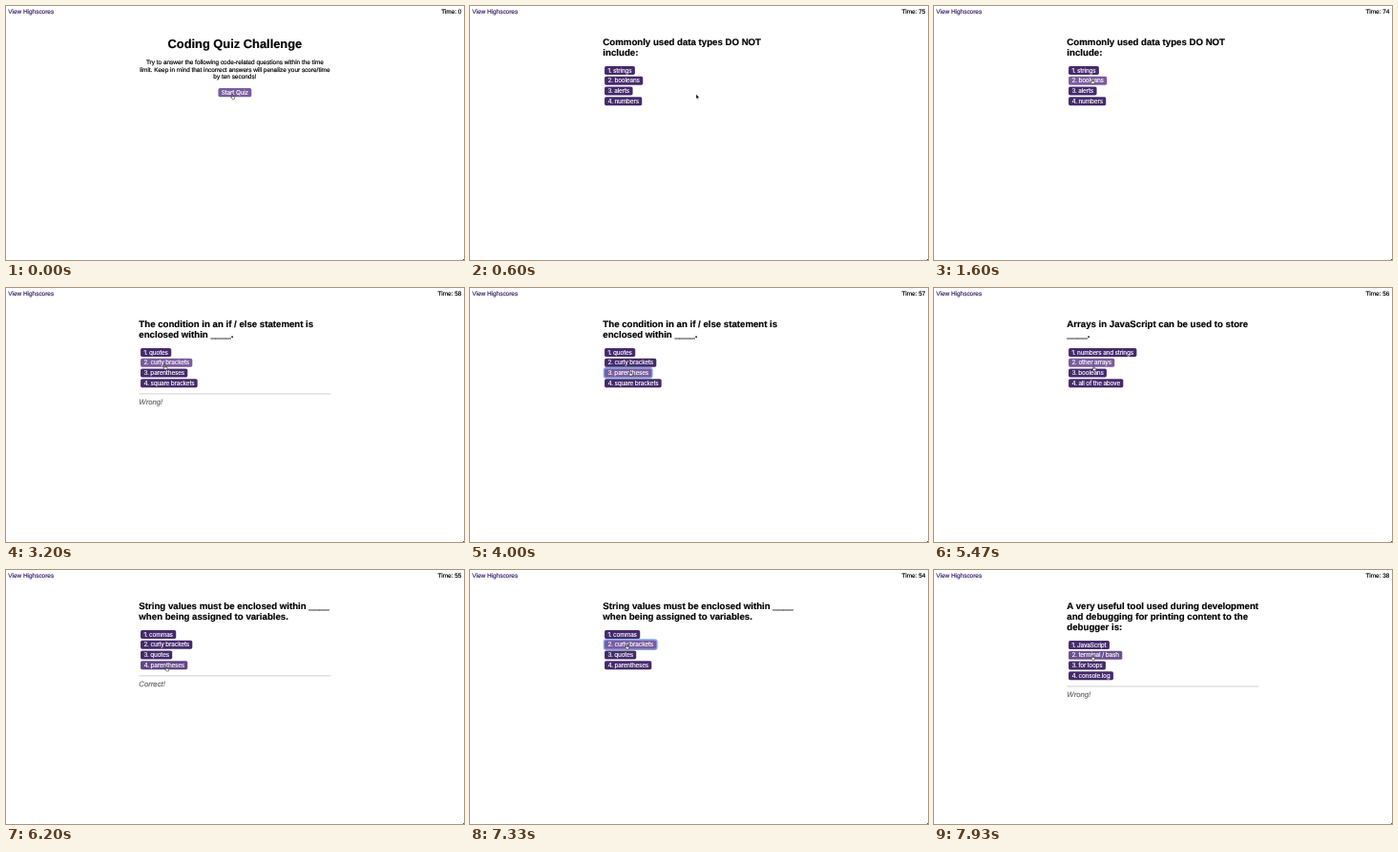
An HTML page that plays this animation: 480 by 266 pixels, repeating every 8000 ms.

```html
<!DOCTYPE html>
<html lang="en">
<head>
<meta charset="utf-8">
<title>Coding Quiz</title>
<style>
  html, body { margin: 0; width: 100%; height: 100%; overflow: hidden; background: #fff; }
  #stage { position: absolute; left: 0; top: 0; width: 480px; height: 266px; overflow: hidden; }
  #page {
    position: absolute; left: -1.35px; top: -1.05px; width: 1438px; height: 800px;
    transform: scale(.335); transform-origin: 0 0;
    font: 19.2px/22px "Liberation Sans", Arial, sans-serif;
    text-rendering: geometricPrecision; white-space: pre; color: #000;
    -webkit-text-stroke: .5px;
  }
  #scores, #timer { position: absolute; top: 10px; }
  #scores { left: 10px; color: #3a2168; }
  #timer { right: 10px; }
  #wrap { position: absolute; left: 419px; top: 100px; width: 600px; }
  #start { text-align: center; }
  h1 { font-size: 38.4px; line-height: 44px; margin: 0 0 25.7px; }
  h2 { font-size: 28.8px; line-height: 33px; margin: 0 0 24.9px; }
  p { margin: 0 0 19.2px; }
  button {
    margin: 5px; padding: 2px 10px; border: 0; border-radius: 5px; color: #fff;
    font: 19.2px/23px Inter, "Liberation Sans", sans-serif; letter-spacing: -.029em;
  }
  #choices button { display: block; }
  #feedback {
    margin-top: 19px; padding-top: 10px; border-top: 2px solid #bbb;
    font-size: 23.04px; line-height: 26px; font-style: italic; color: #666;
  }
  #cursor { position: absolute; left: 0; top: 0; overflow: visible; }
  #corner { position: absolute; left: 479px; top: 265px; width: 1px; height: 1px; background: #555; }
  [hidden] { display: none; }
</style>
</head>
<body>
<div id="stage">
  <div id="page"><div id="scores">View Highscores</div><div id="timer"></div><div id="wrap"><div id="start"><h1>Coding Quiz Challenge</h1><p>Try to answer the following code-related questions within the time<br>limit. Keep in mind that incorrect answers will penalize your score/time<br>by ten seconds!</p><button>Start Quiz</button></div><div id="quiz"><h2 id="title"></h2><div id="choices"></div><div id="feedback"></div></div></div></div>
  <svg id="cursor" width="1" height="1">
    <path id="hand" transform="scale(.31) translate(-5 -1)" fill="#fff" stroke="#000" stroke-width="1.5"
      d="M4 2.5q0-1.7 1.5-1.7t1.5 1.7v4.5l1.8.3q4.7.6 5 2.5 0 4-1.5 7.2h-7L1 11.5q-.7-2 1-2l2 1.5zM7 7v3M10 7.5v3"/>
    <path id="arrow" transform="scale(.335)" fill="#000" stroke="#fff"
      d="M0 0V14l3.2-3 2.2 5 2.3-1-2.2-5H10z"/>
  </svg>
  <div id="corner"></div>
</div>
<script>
const LOOP = 8000, FPS = 15, FADE = 100, HOLD = 85;
const LIMIT = 75, PENALTY = 15, VERDICT_TIME = 1000;
const BASE = [69, 42, 107], HOVER = [122, 92, 158];
const $ = id => document.getElementById(id);

// at: when the screen opens; verdict: judgement of the answer just given
const screens = [
  { at: -LOOP },
  { at: 480, title: 'Commonly used data types DO NOT\ninclude:',
    answers: ['strings', 'booleans', 'alerts', 'numbers'] },
  { at: 2550, verdict: 'Wrong!', title: 'The condition in an if / else statement is\nenclosed within ____.',
    answers: ['quotes', 'curly brackets', 'parentheses', 'square brackets'] },
  { at: 4080, verdict: 'Correct!', title: 'Arrays in JavaScript can be used to store\n____.',
    answers: ['numbers and strings', 'other arrays', 'booleans', 'all of the above'] },
  { at: 6150, verdict: 'Correct!', title: 'String values must be enclosed within ____\nwhen being assigned to variables.',
    answers: ['commas', 'curly brackets', 'quotes', 'parentheses'] },
  { at: 7420, verdict: 'Wrong!', title: 'A very useful tool used during development\nand debugging for printing content to the\ndebugger is:',
    answers: ['JavaScript', 'terminal / bash', 'for loops', 'console.log'] }
];

const home = { x: 237, y: 92.5 };
const moves = [
  { from: 870, to: 1070, x: 201.5, y: 83.5 },
  { from: 1210, to: 1600, x: 165.5, y: 76.5 },
  { from: 2870, to: 3670, x: 167.5, y: 87 },
  { from: 4740, to: 5190, x: 167, y: 79 },
  { from: 5340, to: 5930, x: 168, y: 101 },
  { from: 6400, to: 7270, x: 164, y: 78 },
  { from: 7735, to: 7975, x: 166, y: 90 }
];

const clamp = v => Math.min(1, Math.max(0, v));
const ease = k => k * k * (3 - 2 * k);
const mix = (a, b, k) => a + (b - a) * k;

function pointAt(t) {
  return moves.reduce((p, m) => {
    const k = ease(clamp((t - m.from) / (m.to - m.from)));
    return { x: mix(p.x, m.x, k), y: mix(p.y, m.y, k) };
  }, home);
}

const inside = (r, p) => p.x >= r.left && p.x <= r.right && p.y >= r.top && p.y <= r.bottom;

// A button's tint is the share of the last FADE ms the pointer spent on it.
function hoverLevel(rect, t, opened) {
  const samples = 20;
  let hits = 0;
  for (let i = 0; i < samples; i++) {
    const then = t - (i + .5) * FADE / samples;
    if (then >= opened && inside(rect, pointAt(then))) hits++;
  }
  return hits / samples;
}

const startButton = document.querySelector('#start button');
let shown = null, buttons = [];

function showScreen(screen) {
  if (screen === shown) return;
  shown = screen;
  const { title, answers } = screen;
  $('start').hidden = !!title;
  $('quiz').hidden = !title;
  if (!title) { buttons = [startButton]; return; }
  $('title').textContent = title;
  buttons = answers.map((text, i) => {
    const b = document.createElement('button');
    b.textContent = `${i + 1}. ${text}`;
    return b;
  });
  $('choices').replaceChildren(...buttons);
}

function timeLeft(t) {
  const begun = screens[1].at;
  if (t < begun) return 0;
  const wrong = screens.filter(s => s.at <= t && s.verdict === 'Wrong!').length;
  return LIMIT - Math.floor((t - begun) / 1000) - PENALTY * wrong;
}

function paintPointer(t) {
  const p = pointAt(t);
  const pressed = screens.some(s => t >= s.at - HOLD && t < s.at);
  let over = false;
  for (const b of buttons) {
    const rect = b.getBoundingClientRect(), hit = inside(rect, p);
    const level = hoverLevel(rect, t, shown.at);
    b.style.background = `rgb(${BASE.map((c, n) => Math.round(mix(c, HOVER[n], level)))})`;
    b.style.boxShadow = pressed && hit ? '0 0 0 4px #7fa9ee' : 'none';
    over ||= hit;
  }
  $('hand').style.display = over ? '' : 'none';
  $('arrow').style.display = over ? 'none' : '';
  $('cursor').style.transform = `translate(${p.x}px, ${p.y}px)`;
}

function draw(ms) {
  // Hold each picture for one step; the small lead absorbs rounding.
  const t = Math.floor((ms % LOOP) * FPS / 1000 + .1) * 1000 / FPS % LOOP + 5;
  const screen = screens.findLast(s => s.at <= t);
  const verdict = t < screen.at + VERDICT_TIME && screen.verdict || '';
  showScreen(screen);
  $('timer').textContent = 'Time: ' + timeLeft(t);
  $('feedback').hidden = !verdict;
  $('feedback').textContent = verdict;
  paintPointer(t);
}

const begin = performance.now();
function tick() {
  draw(performance.now() - begin);
  requestAnimationFrame(tick);
}
tick();
</script>
</body>
</html>
```
